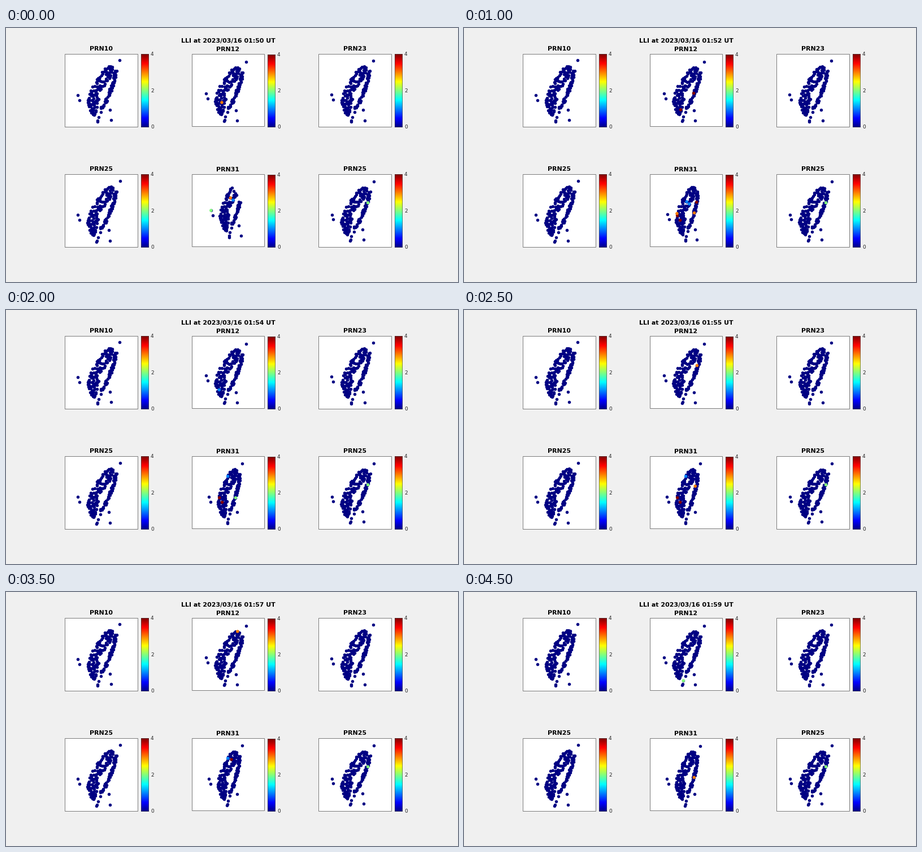
These frames come from a looping animation (800 px wide and 450 px high, 5000 ms). A matplotlib script:

```python
import numpy as np
import matplotlib.pyplot as plt
from matplotlib.animation import FuncAnimation
from matplotlib.patches import Rectangle

W, H, DPI = 800, 450, 100
FRAMES, STEP = 10, 500
PX = 72 / DPI
DOT = (5.5 * PX) ** 2
NUDGE = -0.4
LEVELS = 256
plt.rcParams["font.family"] = "DejaVu Sans"


def jet(level):
    """Red, green and blue ramps of the jet map."""
    pos = 4 * (np.asarray(level) + 1) / LEVELS
    return np.stack([np.clip(1.5 - abs(pos - c), 0, 1) for c in (3, 2, 1)], axis=-1)


def value_colour(v):
    return jet(min(LEVELS - 1, int(v * LEVELS / 4)))


# Island outline by height: west coast, inner edge of the plain, east coast
KNOTS = [67, 76, 90, 108, 131, 155, 167]
WEST = [184, 170, 162, 150, 143, 152, 162]
PLAIN = [189, 190, 184, 170, 164, 159, 163]
EAST = [189, 197, 194, 189, 179, 165, 162]
ISLETS = [(184, 145), (186.5, 163.5), (201.5, 57.5), (127.5, 119), (130.5, 128)]
TAIL = [149, 158, 164, 166.5]


def edge(xs, y):
    return np.interp(y, KNOTS, xs)


def scatter_band(rng, count, low, high, left, right, gap):
    """Random dots between two edges, kept a little apart."""
    pts = []
    while len(pts) < count:
        y = rng.uniform(low, high)
        x = left(y) + (right(y) - left(y)) * rng.random()
        if all(np.hypot(x - p, y - q) > gap for p, q in pts):
            pts.append((x, y))
    return pts


rng = np.random.default_rng(12)
plain = scatter_band(rng, 100, 68, 155, lambda y: edge(WEST, y),
                     lambda y: edge(PLAIN, y), 2.2)
strip = scatter_band(rng, 40, 74, 143, lambda y: edge(EAST, y) - 5,
                     lambda y: edge(EAST, y), 1.6)
tail = [(edge(EAST, y), y) for y in TAIL]
STATIONS = np.array(ISLETS + tail + plain + strip)

# Name and tilt of the station map: x by x, x by y, y by x, y by y
PANELS = [
    ("PRN10", (0, 0, 0, 0)),
    ("PRN12", (-.05, -.01, .075, -.01)),
    ("PRN23", (-.01, 0, .02, 0)),
    ("PRN25", (-.015, -.025, .025, 0)),
    ("PRN31", (-.155, .064, .025, -.019)),
    ("PRN25", (-.025, -.03, .02, -.03)),
]
LEFTS, TOPS = (104, 329, 553), (46, 259)
SIDE = 129
PIVOT = np.array([164, 110])
FLICKER, DRIFTER = 1, 4

# Marks that last: panel, place, first and last minute, value
LASTING = [
    (5, (641, 310), 0, 9, 2),
    (1, (407, 116), 1, 3, 4),
    (4, (412, 309), 1, 3, 4),
    (4, (408, 328), 1, 3, 3),
    (4, (378, 333), 2, 5, 4),
    (4, (383, 341), 2, 5, 4),
    (4, (393, 295), 3, 7, 1),
]


def corner(i):
    return LEFTS[i % 3], TOPS[i // 3]


def place(i, frame):
    """Dot positions of one panel at one frame."""
    shift = np.array(corner(i)) - corner(0)
    tilt = np.reshape(PANELS[i][1], (2, 2))
    pts = STATIONS + shift + (STATIONS - PIVOT) @ tilt.T
    if i != DRIFTER:
        return pts
    ease = max(0, 1 - frame / 2.2)
    pts += (1.2 + 3.3 * ease - .06 * frame, -7.3 * ease + .06 * frame)
    # The north-east corner rises into view during the first minutes
    rising = frame < 4
    limit = 225.5 - 9.7 * ease if rising else np.inf
    seen = pts @ (.877, -.48) < limit
    seen[1] = rising
    return pts[seen]


def marks(frame, spots):
    """Places and values of all raised dots."""
    out = [(xy, v) for _, xy, first, last, v in LASTING if first <= frame <= last]
    pick = np.random.default_rng(40 + frame)
    for i, count in ((FLICKER, 1), (DRIFTER, 3 if frame < 4 else 1)):
        for k in pick.choice(len(spots[i]), count, replace=False):
            out.append((spots[i][k], pick.integers(1, 5)))
    return out


fig = plt.figure(figsize=(W / DPI, H / DPI), dpi=DPI, facecolor="#f0f0f0")
ax = fig.add_axes([0, 0, 1, 1])
ax.axis("off")


def label(x, y, text, size, **kw):
    return ax.text(x, y, text, fontsize=size * PX, va="baseline", **kw)


def frame_box(x, y, w, h, **kw):
    ax.add_patch(Rectangle((x + .5, y + .5), w, h, snap=False, **kw))


def draw_panel(i):
    x, y = corner(i)
    mid = int(i % 3 == 1)
    bar = x + 135 - mid
    frame_box(x, y, SIDE - mid, SIDE - mid, fc="white", ec="#7c7c7c", lw=PX, zorder=1)
    label(x + 64.5 - mid, y - 6 + mid, PANELS[i][0], 11, ha="center", weight="bold")
    top, bottom = y + mid, y + SIDE
    ax.imshow(jet(np.arange(LEVELS))[::-1, None, :], aspect="auto",
              extent=(bar, bar + 14, bottom + 1, top), zorder=1)
    frame_box(bar, top, 13, bottom - top, fc="none", ec="#404040", lw=.6 * PX, zorder=2)
    for tick, ty in zip("420", np.linspace(top, bottom, 3)):
        label(bar + 17, ty + 3.2, tick, 9, ha="left", color="#262626")
    return ax.scatter([], [], s=DOT, color=value_colour(0), lw=0, zorder=3)


dots = [draw_panel(i) for i in range(len(PANELS))]
hits = ax.scatter([], [], s=DOT, lw=0, zorder=4)
heading = label(393.5, 26, "", 11, ha="center", weight="bold")
ax.set_xlim(0, W)
ax.set_ylim(H, 0)


def draw(frame):
    heading.set_text(f"LLI at 2023/03/16 01:{50 + frame} UT")
    spots = [place(i, frame) for i in range(len(PANELS))]
    for dot, pts in zip(dots, spots):
        dot.set_offsets(pts + NUDGE)
    places, values = zip(*marks(frame, spots))
    hits.set_offsets(np.array(places) + NUDGE)
    hits.set_facecolors([value_colour(v) for v in values])
    return []


anim = FuncAnimation(fig, draw, frames=FRAMES, interval=STEP, repeat=True,
                     repeat_delay=0, init_func=lambda: draw(0))
plt.show()
```
